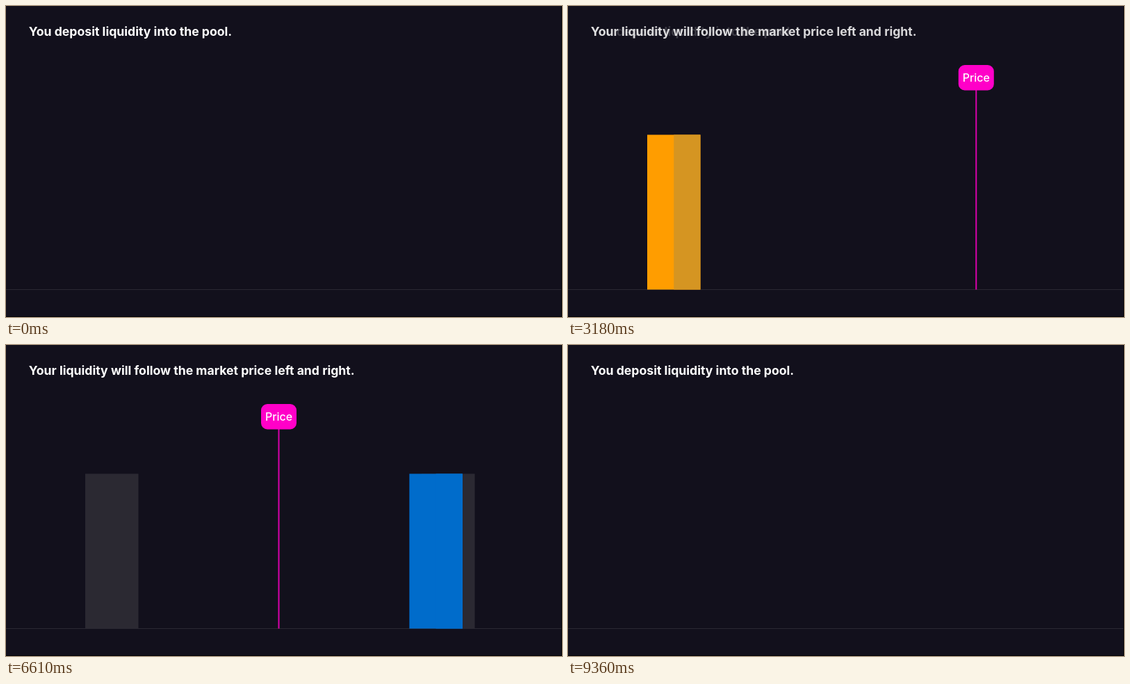
An HTML page that plays this animation: 800x448 px, repeating every 9.39 s.

```html
<!DOCTYPE html>
<html lang="en">
<head>
<meta charset="utf-8">
<style>
  html, body { margin: 0; width: 100%; height: 100%; overflow: hidden; background: #12101c; }
  svg { display: block; width: 800px; height: 448px; }
  text { font-family: Inter, "Liberation Sans", sans-serif; fill: #fff; }
  .title { font-size: 17.65px; font-weight: 700; }
  .ghost { fill: #2b2932; }
</style>
</head>
<body>
<svg viewBox="0 0 800 448">
  <rect y="408" width="799" height="1" fill="#2b2933"/>
  <path d="M799 0h1v448H0v-1h799z" fill="#030305"/>
  <text class="title" id="title1" x="32.8" y="43">You deposit liquidity into the pool.</text>
  <text class="title" id="title2" x="32.8" y="43">Your liquidity will follow the market price left and right.</text>
  <g id="scene">
    <rect class="ghost" id="ghost1" x="114" y="185.5" width="76.5" height="223"/>
    <rect class="ghost" id="ghost2" x="598" y="185.5" width="76.5" height="223"/>
    <g id="bar">
      <rect id="whole" width="76.5"/>
      <rect id="half" x="38.25" width="38.25"/>
    </g>
    <g id="price">
      <rect x="-1" y="115" width="2" height="293.5" fill="#d900ac"/>
      <rect x="-25.5" y="85" width="51" height="36.5" rx="9" fill="#ff00c8"/>
      <text y="109" font-size="16" font-weight="500" text-anchor="middle">Price</text>
    </g>
  </g>
</svg>
<script>
const LOOP = 9390;
const ORANGE = [255, 157, 0], BLUE = [0, 108, 203];
const $ = id => document.getElementById(id);
const set = (id, attrs) => {
  for (const k in attrs) $(id).setAttribute(k, attrs[k]);
};
const ramp = (t, start, dur) => Math.min(1, Math.max(0, (t - start) / dur));
const ease = p => p < .5 ? 16 * p ** 5 : 1 - 16 * (1 - p) ** 5;
const step = (t, start, dur = 750) => ease(ramp(t, start, dur));
const lerp = (a, b, p) => a + (b - a) * p;
const mix = (a, b, p) => a.map((v, i) => lerp(v, b[i], p));
const rgb = c => `rgb(${c.map(Math.round)})`;

function draw(t) {
  const grow = step(t, 892);
  const priceOut = step(t, 2732), barOut = step(t, 3985);
  const priceBack = step(t, 5204), barBack = step(t, 6400, 600);
  const fade = 1 - ramp(t, 7850, 270);

  set('title1', { opacity: t < 8500 ? 1 - priceOut : ramp(t, 9090, 270) });
  set('title2', { opacity: priceOut * fade });
  set('scene', { opacity: grow * fade });
  set('ghost1', { opacity: barOut > 0 ? 1 : 0 });
  set('ghost2', { opacity: barBack > 0 ? 1 : 0 });

  const height = 223 * grow, y = 408.5 - height;
  const right = mix(BLUE, ORANGE, priceOut);
  set('whole', { y, height, fill: rgb(mix(ORANGE, BLUE, priceBack)) });
  set('half', { y, height, fill: rgb(mix(right, BLUE, priceBack)) });

  const barX = lerp(lerp(114, 598, barOut), 393, barBack);
  const priceX = lerp(lerp(152.5, 674.2, priceOut), 392.5, priceBack);
  set('bar', { transform: `translate(${barX} 0)` });
  set('price', { transform: `translate(${priceX} 0)` });
}

const begin = performance.now();
function tick() {
  draw((performance.now() - begin) % LOOP);
  requestAnimationFrame(tick);
}
tick();
</script>
</body>
</html>
```
